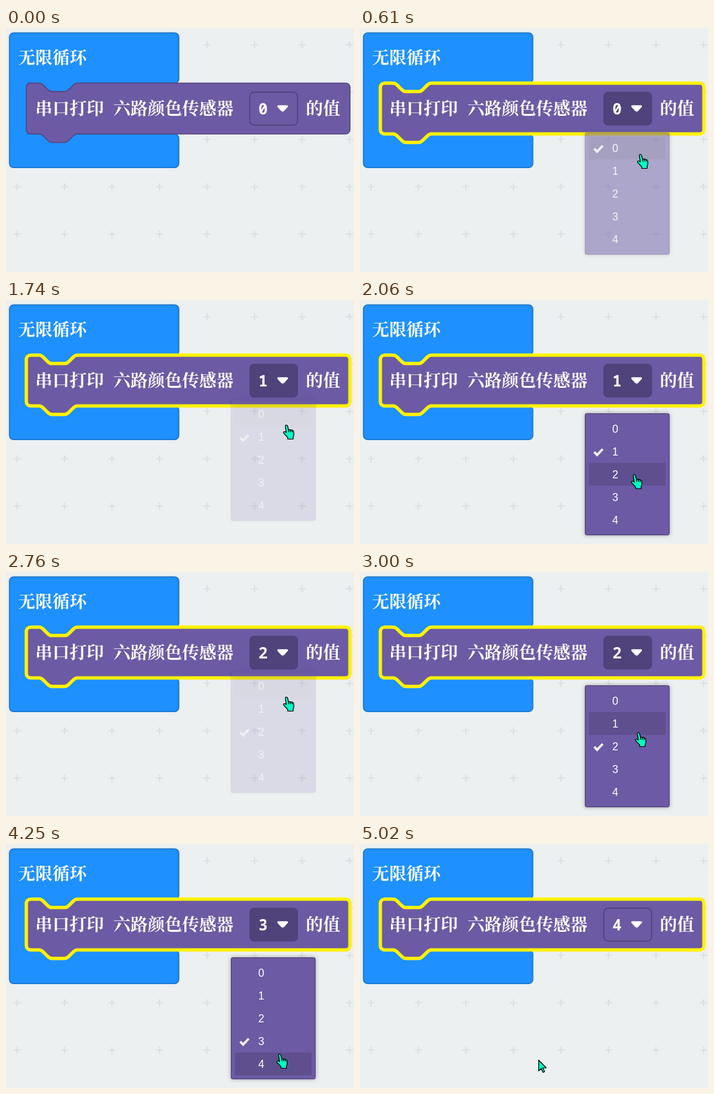
An HTML page that plays this animation: 517x364 px, repeating every 5060 ms.

```html
<!DOCTYPE html>
<html lang="zh">
<head>
<meta charset="utf-8">
<style>
  html, body { margin: 0; width: 100%; height: 100%; overflow: hidden; background: #ecf0f1; }
  svg { display: block; }
  .label { font: 700 25.5px "Noto Serif CJK SC", "Noto Serif SC", "Noto Sans CJK SC", "Noto Sans CJK", serif; fill: #fff; }
  .value { font: 800 23px "Noto Sans Mono", monospace; fill: #fff; text-anchor: middle; }
  .item { font: 16px "Liberation Sans", Arial, sans-serif; fill: #fff; text-anchor: middle; }
  .cursor { fill: #00ffc4; stroke: #000; stroke-width: 1.2; stroke-linejoin: round; }
  .panel { filter: drop-shadow(0 0 3px rgba(0, 0, 0, .32)); }
</style>
</head>
<body>
<svg width="517" height="364" viewBox="0 0 517 364">
  <defs>
    <pattern id="grid" x="-19.1" y="-10.3" width="70.6" height="70.6" patternUnits="userSpaceOnUse">
      <path d="M30 35.3H40.6M35.3 30V40.6" stroke="#d9dce0" stroke-width="1.5"/>
    </pattern>
  </defs>
  <rect width="517" height="364" fill="#ecf0f1"/>
  <rect width="517" height="364" fill="url(#grid)"/>

  <path fill="#1e90ff" stroke="#1873cc" stroke-width="1.58" transform="translate(.2 .2)"
    d="M11.3 7H250.2a6.3 6.3 0 0 1 6.3 6.3V75.7a6.3 6.3 0 0 1-6.3 6.3H110V97H45V82H32V158H250.2a6.3 6.3 0 0 1 6.3 6.3V201.7a6.3 6.3 0 0 1-6.3 6.3H11.3A6.3 6.3 0 0 1 5 201.7V13.3A6.3 6.3 0 0 1 11.3 7Z"/>
  <text class="label" x="18" y="53">无限循环</text>

  <path id="block" transform="translate(30.2 82.2) scale(1.58)" fill="#6c5aa4"
    d="M0 4a4 4 0 0 1 4-4H12c2 0 3 1 4 2l4 4c1 1 2 2 4 2h12c2 0 3-1 4-2l4-4c1-1 2-2 4-2H300.3a4 4 0 0 1 4 4V44a4 4 0 0 1-4 4H48c-2 0-3 1-4 2l-4 4c-1 1-2 2-4 2h-12c-2 0-3-1-4-2l-4-4c-1-1-2-2-4-2H4a4 4 0 0 1-4-4Z"/>
  <text class="label" x="43.4" y="129">串口打印</text>
  <text class="label" x="159.5" y="129">六路颜色传感器</text>
  <text class="label" x="445.6" y="129">的值</text>
  <rect id="field" x="362.2" y="95.8" width="71" height="49" rx="6.3" stroke="#50427b" stroke-width="1.5"/>
  <text id="value" class="value" x="382" y="129"></text>
  <path fill="#fff" d="M405 115.3h12q3.2.3 1.4 2.8l-5.2 5.6q-2.2 2-4.4 0l-5.2-5.6q-1.8-2.5 1.4-2.8z"/>

  <g id="menu">
    <rect class="panel" x="334.5" y="169.5" width="125" height="181" rx="2" fill="#6c5aa4" stroke="#50427b"/>
    <rect id="hover" x="340" width="114" height="34" fill="#5f4f8f"/>
    <path id="check" d="M348 192.8l4.3 4.4 8.3-8.8" fill="none" stroke="#f4f2f8" stroke-width="3.4"/>
  </g>

  <path id="arrow" class="cursor" d="M.5.5V16.5L4.2 13 6.8 18.7 9.2 17.6 6.6 12H11.7Z"/>
  <g id="hand" class="cursor">
    <path d="M4 2.4Q3.8.6 5.3.5T7.3 2L8.6 7.2 14 8.2q2.4.6 2.5 2.8l.1 3.6q0 2-1 3.7v3.2H7.6V19.2L2 13.2q-1.6-1.9.1-2.7 1.5-.4 3.4 1.3z"/>
    <path d="M8.6 7.2L9.2 11.2M11.3 7.8L11.8 11.2M14 8.3L14.3 11.4" fill="none"/>
  </g>
</svg>
<script>
const $ = id => document.getElementById(id);
const LOOP = 5060, STEP = 40, LEAD = 32, ROW = 34, TOP = 175, DROP = 25;

// Each pick: menu opening, menu closing, and the hand's path as [time, x, y].
const picks = [
  { open: 570, close: 1210, end: 1370, row: 1, path: [[570, 411, 186], [890, 412, 242], [1050, 410, 227]] },
  { open: 1740, close: 2310, end: 2430, row: 2, path: [[1740, 411, 186], [2060, 402, 260]] },
  { open: 2760, close: 3360, end: 3560, row: 3, path: [[2760, 411, 186], [3240, 404, 291]] },
  { open: 3930, close: 4540, end: 4740, row: 4, path: [[3930, 411, 186], [4250, 401, 313]] }
];
const enter = [[40, 237, 221], [200, 383, 163]];
const leave = [[4740, 392, 314], [5020, 265, 322]];

for (let i = 0; i < 5; i++) {
  const text = document.createElementNS("http://www.w3.org/2000/svg", "text");
  text.setAttribute("class", "item");
  text.setAttribute("x", 379.3);
  text.setAttribute("y", 197.8 + i * ROW);
  text.textContent = i;
  $("menu").append(text);
}

const clamp = v => Math.min(1, Math.max(0, v));
const smooth = v => v * v * (3 - 2 * v);
const mix = (a, b, p) => a + (b - a) * p;
const snap = (t, from) => from + Math.floor((t - from) / STEP) * STEP;

// CSS "ease": cubic-bezier(.25, .1, .25, 1)
function ease(x) {
  x = clamp(x);
  let lo = 0, hi = 1;
  for (let i = 0; i < 20; i++) {
    const s = (lo + hi) / 2, r = 1 - s;
    if (.75 * r * s + s ** 3 < x) lo = s; else hi = s;
  }
  const r = 1 - lo;
  return .3 * r * r * lo + 3 * r * lo * lo + lo ** 3;
}

function along(path, t) {
  let [, x, y] = path[0];
  for (let i = 1; i < path.length; i++) {
    const [t0, x0, y0] = path[i - 1], [t1, x1, y1] = path[i];
    if (t < t0) break;
    const p = smooth(clamp((t - t0) / (t1 - t0)));
    x = mix(x0, x1, p);
    y = mix(y0, y1, p);
  }
  return [x, y];
}

function place(id, pos) {
  $(id).style.display = pos ? "" : "none";
  if (pos) $(id).setAttribute("transform", `translate(${Math.round(pos[0])} ${Math.round(pos[1])})`);
}

function render(t) {
  const pick = picks.find(p => t >= p.open && t < p.end);
  const closing = pick && t >= pick.close;
  const value = picks.filter(p => t >= p.close).length;
  const selected = t >= picks[0].open;
  let show = 0, hand = null, arrow = null;

  if (pick) {
    const from = closing ? pick.close : pick.open;
    const now = snap(t, from);
    hand = along(pick.path, now);
    let row = pick.row;
    if (closing) {
      show = 1 - ease((now - from + LEAD) / (pick.end - from + LEAD));
      const target = pick.row === 4 ? leave[0].slice(1) : [412, 160];
      const p = smooth((now - from) / (pick.end - from));
      hand = hand.map((v, i) => mix(v, target[i], p));
    } else {
      show = ease((now - from + LEAD) / 250);
      row = Math.floor((hand[1] - TOP + DROP * (1 - show)) / ROW);
    }
    $("hover").setAttribute("y", TOP + row * ROW);
    $("check").setAttribute("transform", `translate(0 ${(pick.row - 1) * ROW})`);
    $("menu").setAttribute("transform", `translate(0 ${-DROP * (1 - show)})`);
  } else if (t >= 40 && t < 240) {
    arrow = along(enter, snap(t, 40));
  } else if (t >= 4740) {
    arrow = along(leave, snap(t, 4740));
  }

  $("menu").style.display = pick ? "" : "none";
  $("menu").style.opacity = show;
  $("value").textContent = value;
  $("field").setAttribute("fill", pick && !closing ? "#50427b" : "#6c5aa4");
  $("block").setAttribute("stroke", selected ? "#fff200" : "#544681");
  $("block").setAttribute("stroke-width", selected ? 3.2 : 1);
  place("hand", hand);
  place("arrow", arrow);
}

const start = performance.now();
function tick() {
  render((performance.now() - start) % LOOP);
  requestAnimationFrame(tick);
}
tick();
</script>
</body>
</html>
```
